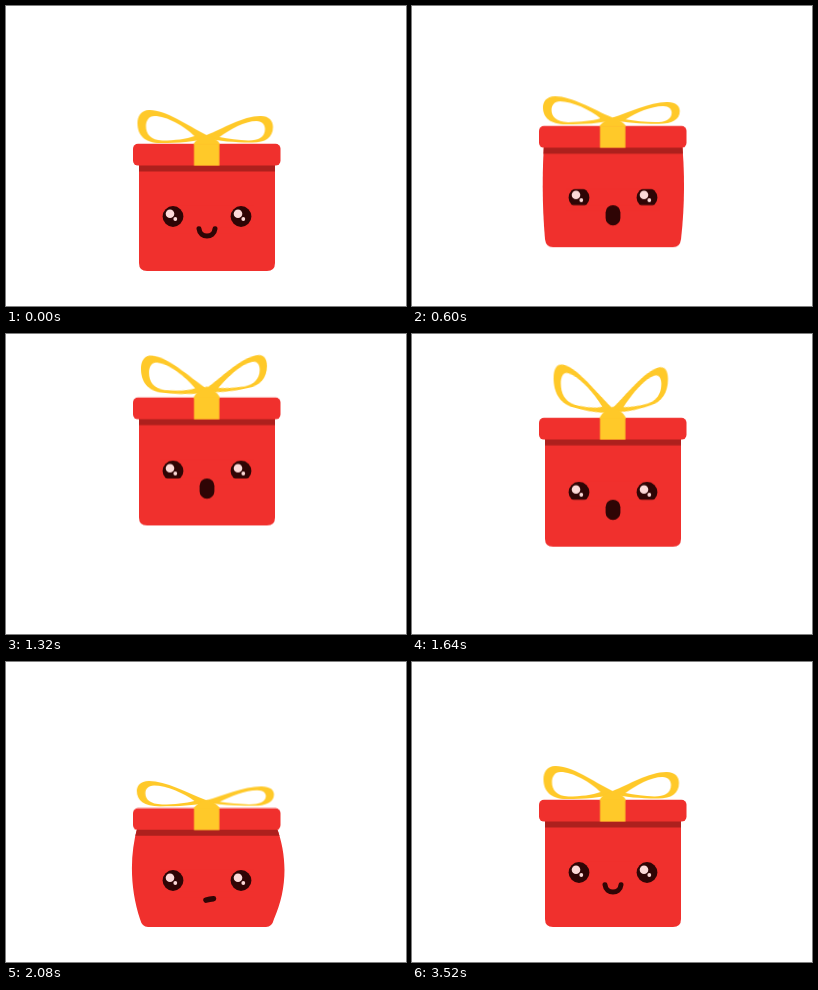
Recreate the animation shown at these times as an HTML page. Size 400 by 300 pixels, loop 3560 ms.

```html
<!DOCTYPE html>
<html lang="en">
<head>
<meta charset="utf-8">
<title>Jumping gift</title>
<style>
html, body { margin: 0; width: 100%; height: 100%; overflow: hidden; background: #fff; }
svg { display: block; width: 400px; height: 300px; }

svg * { animation: 3560ms linear infinite; }
.red { fill: #f0302d; }
.dark { fill: #2f0505; }
.shine { fill: #fcd9d8; }
.gold { fill: #ffc929; }

.jump { animation-name: jump; }
.body { animation-name: bulge; }
.lid { animation-name: lid; }
.face { animation-name: face; }
.cheek { animation-name: cheek; }
.brow { animation-name: brow; }
.left { animation-name: left; }
.right { animation-name: right; }
.knot { animation-name: knot; }
.mouth {
  fill: none; stroke: #2f0505; stroke-linecap: round; stroke-linejoin: round;
  animation-name: mouth;
}

@keyframes jump {
  0%, 15.34% { transform: translateY(0); animation-timing-function: cubic-bezier(.2, .8, .4, 1); }
  32.3% { transform: translateY(-74.5px); animation-timing-function: cubic-bezier(.3333, 0, .6667, 0); }
  52.95%, 100% { transform: translateY(0); }
}

@keyframes bulge {
  0%, 21%, 52.95%, 68.5%, 100% {
    d: path("M133 150C133 185 133 220 133 257Q133 265 141 265H261Q269 265 269 257C269 220 269 185 269 150Z");
    animation-timing-function: ease-in-out;
  }
  12.36%, 58.43% {
    d: path("M131.5 165C123 195 124.5 228 134 257Q136 265 142 265H260Q266 265 268 257C281 228 282 195 270.5 165Z");
    animation-timing-function: ease-in-out;
  }
  16.85% {
    d: path("M132.5 154C130 188 130 222 133 257Q134 265 141 265H261Q268 265 269 257C273 222 273 188 269.5 154Z");
    animation-timing-function: ease-out;
  }
}

@keyframes lid {
  0%, 69.7%, 100% { transform: translateY(0); animation-timing-function: ease-in-out; }
  12.36% { transform: translateY(8.5px); animation-timing-function: ease-in; }
  16.85% { transform: translateY(6px); animation-timing-function: ease-out; }
  27% { transform: translateY(0); }
  37.08% { transform: translateY(-.7px); }
  46.07%, 52.95% { transform: translateY(-1.7px); animation-timing-function: ease-out; }
  58.43% { transform: translateY(8.5px); animation-timing-function: ease-in-out; }
}

@keyframes face {
  0%, 69.7%, 100% { transform: translateY(0); animation-timing-function: ease-in-out; }
  12.36% { transform: translateY(8px); animation-timing-function: ease-in; }
  16.85% { transform: translateY(5px); animation-timing-function: ease-out; }
  27%, 52.95% { transform: translateY(0); animation-timing-function: ease-out; }
  58.43% { transform: translateY(8px); animation-timing-function: ease-in-out; }
}

@keyframes cheek {
  0%, 12.36%, 57%, 100% { transform: translateY(0); }
  16.3%, 51% { transform: translateY(-3.5px); }
}

@keyframes brow {
  0%, 12.36%, 20%, 100% { transform: translateY(0); }
  16.3% { transform: translateY(2.5px); }
}

@keyframes mouth {
  0%, 7%, 64%, 100% {
    d: path("M193 222.8C194 232.5 208 232.5 209 222.8");
    stroke-width: 5px;
  }
  12%, 58.43% {
    d: path("M200 230.1C202 229.5 205 228.9 207.5 228.7");
    stroke-width: 5.5px;
  }
  15.4%, 54% {
    d: path("M201 225.3C201 227 201 229 201 230.8");
    stroke-width: 14.8px;
  }
}

@keyframes left {
  0%, 69.7%, 100% { transform: skewY(0deg) scale(1, 1); animation-timing-function: ease-in-out; }
  12.36%, 58.43% { transform: skewY(0deg) scale(1.01, .77); animation-timing-function: ease-in-out; }
  16.85% { transform: skewY(0deg) scale(1.008, .85); }
  37.08% { transform: skewY(5.9deg) scale(.95, 1.09); }
  46.07% { transform: skewY(15.2deg) scale(.854, 1.214); animation-timing-function: ease-out; }
  49.5% { transform: skewY(17deg) scale(.83, 1.23); animation-timing-function: ease-in-out; }
}

@keyframes right {
  0%, 69.7%, 100% { transform: skewY(0deg) scale(1, 1); animation-timing-function: ease-in-out; }
  12.36%, 58.43% { transform: skewY(0deg) scale(1.015, .73); animation-timing-function: ease-in-out; }
  16.85% { transform: skewY(0deg) scale(1.012, .82); }
  37.08% { transform: skewY(-12.2deg) scale(.91, 1.17); }
  46.07% { transform: skewY(-18.3deg) scale(.835, 1.33); animation-timing-function: ease-out; }
  49.5% { transform: skewY(-19.5deg) scale(.82, 1.35); animation-timing-function: ease-in-out; }
}

@keyframes knot {
  0%, 69.7%, 100% { transform: scaleY(1); }
  12.36%, 16.85%, 58.43% { transform: scaleY(.95); }
  37.08%, 49.5% { transform: scaleY(1.25); }
}
</style>
</head>
<body>
<svg viewBox="0 0 400 300">
  <defs>
    <clipPath id="inside">
      <path class="body" d="M133 150V257Q133 265 141 265H261Q269 265 269 257V150Z"/>
    </clipPath>
    <g id="eye">
      <circle class="dark" r="10.4"/>
      <circle class="shine" cx="-3" cy="-2.7" r="4.3"/>
      <circle class="shine" cx="2.3" cy="2.5" r="1.9"/>
    </g>
  </defs>

  <g class="jump">
    <path class="body red" d="M133 150V257Q133 265 141 265H261Q269 265 269 257V150Z"/>

    <g class="face">
      <use href="#eye" x="167" y="210.5"/>
      <use href="#eye" x="235" y="210.5"/>
      <rect class="cheek red" x="154" y="221.5" width="94" height="6"/>
      <rect class="brow red" x="154" y="193" width="94" height="6.8"/>
      <path class="mouth" d="M193 222.8C194 232.5 208 232.5 209 222.8" stroke-width="5"/>
    </g>

    <g clip-path="url(#inside)">
      <rect class="lid" x="120" y="150" width="165" height="15.5" fill="#ad201d"/>
    </g>

    <g class="lid">
      <rect class="red" x="127" y="137.8" width="147.5" height="21.8" rx="5"/>
      <g class="gold" fill-rule="evenodd" transform="translate(200.5 132)">
        <path class="left" d="M0-3C-20-13-40-28-57-28C-66-28-69-21-69-15C-69-3-62 5-46 5C-28 5-12 4 0 0Z
          M-12-2C-22-12-40-22-52-22C-58-22-60.5-17-60.5-12C-60.5-4-56 2-44 2.5C-32 2.5-20 1-12-2Z"/>
        <path class="right" d="M0-3C16-9 36-22 54-22C63-22 66.5-17 66.5-11C66.5 0 58 5 44 4.5C28 4.5 12 3 0 0Z
          M13-1C24-9 38-17 50-17C56-17 58.5-13 58.5-9C58.5-1 52 2.5 42 2.5C32 2 22 1 13-1Z"/>
      </g>
      <g class="gold" transform="translate(200.7 138)">
        <path class="knot" d="M-12.7 .5V-1Q-9-6 0-9Q9-6 12.7-1V.5Z"/>
        <rect x="-12.7" y="-.2" width="25.4" height="21.8"/>
      </g>
    </g>
  </g>
</svg>
</body>
</html>
```
